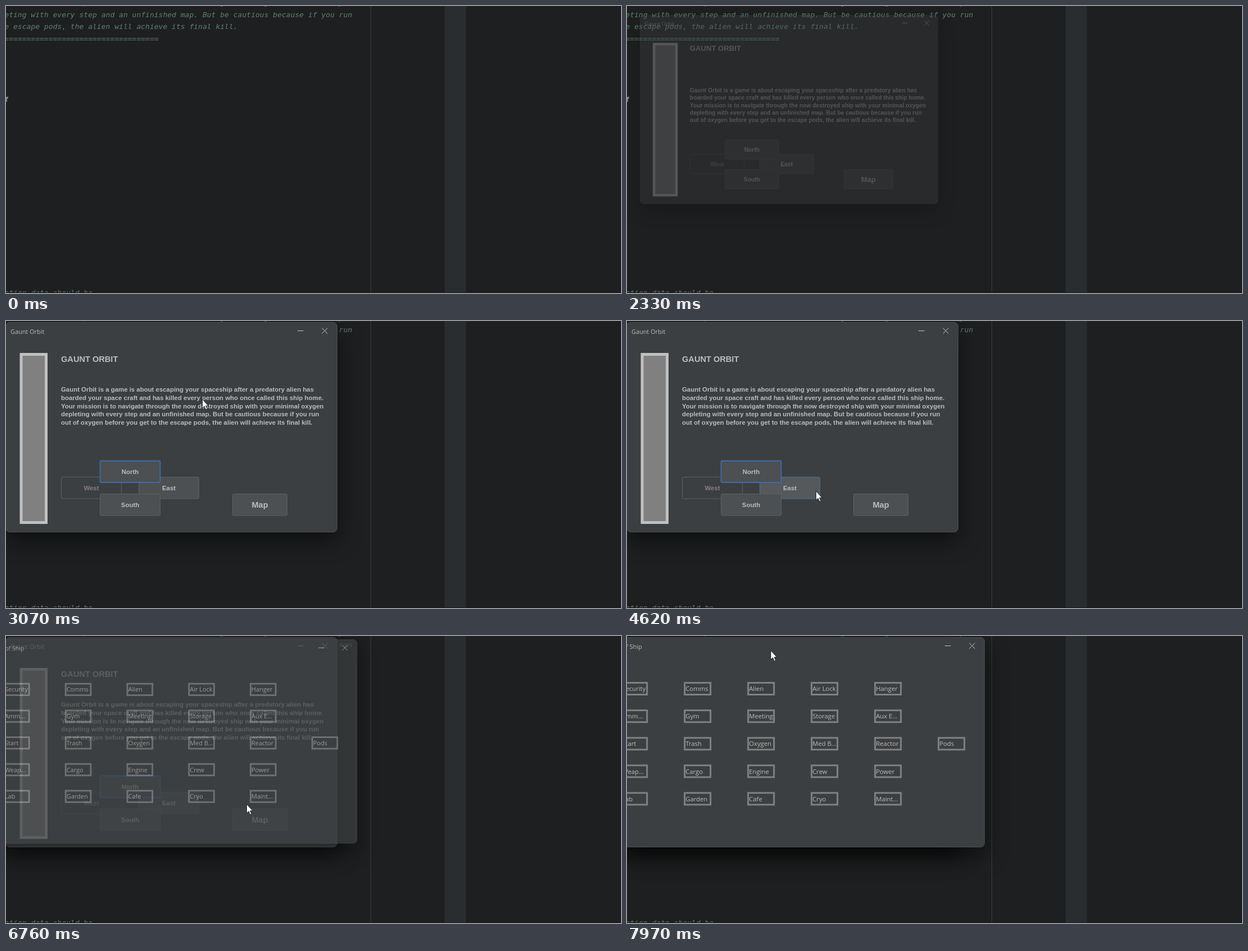
Animation, 1095 px wide and 512 px high, one loop 8000 ms. Source, as an HTML page:

```html
<!DOCTYPE html>
<html lang="en">
<head>
<meta charset="utf-8">
<title>Game window over an editor</title>
<style>
  html, body { margin: 0; width: 100%; height: 100%; overflow: hidden; background: #1e1f20; }
  svg { display: block; width: 100%; height: 100%; }
  text { fill: #bbb; white-space: pre; }
  .code text { font: italic 13.02px "DejaVu Sans Mono", monospace; fill: #5f826b; }
  .code .plain { font-style: normal; fill: #bcbec4; }
  .ui { font: 11.3px "Open Sans", sans-serif; }
  .title { font: 10.9px "Open Sans", sans-serif; }
  .bold { font: bold 11.42px "Liberation Sans", Arial, sans-serif; }
  .large { font: bold 14.6px "Liberation Sans", Arial, sans-serif; }
  .mid { text-anchor: middle; }
  .frame { fill: #3c3f41; stroke: #4b4e50; filter: drop-shadow(0 14px 19px rgba(0, 0, 0, .55)); }
  .controls { stroke: #c4c4c4; fill: none; }
  .button rect { fill: #4c5052; stroke: #5e6060; }
  .button.off rect { fill: none; }
  .button.off text { fill: #857f80; }
  .button.focus rect { stroke: #3f6cab; stroke-width: 1.8; }
  .button.hover rect { fill: #55595c; stroke: #46709f; }
  .room { fill: none; stroke: #808080; stroke-width: 3; }
</style>
</head>
<body>
<svg viewBox="0 0 1095 512" preserveAspectRatio="none">
  <rect width="1095" height="512" fill="#1e1f20"/>
  <rect x="649" width="1" height="512" fill="#3a3c3f"/>
  <rect x="781" width="38" height="512" fill="#2a2d30"/>
  <g class="code" id="code"></g>
  <path d="M0 511.5H1095M1094.5 0V512" stroke="#17181a"/>
  <g id="game"></g>
  <g id="map"></g>
  <path id="beam" d="M0 .5H2.5L3.5 1.5L4.5 .5H7M3.5 1.5V13.5M0 14.5H2.5L3.5 13.5L4.5 14.5H7" fill="none" stroke="#d0d0d0"/>
  <path id="arrow" d="M.5 .5V16.5L4.2 13.2L6.8 19.2L9.2 18.2L6.7 12.3H11.3Z" fill="#fff" stroke="#15181a" stroke-width=".9"/>
</svg>
<script>
const LOOP = 8000, TICK = 67;
const GAME_OPENS = 35, MAP_OPENS = 100;
const $ = id => document.getElementById(id);

function add(parent, tag, attrs, content) {
  const node = document.createElementNS('http://www.w3.org/2000/svg', tag);
  for (const name in attrs) node.setAttribute(name, attrs[name]);
  if (content) node.textContent = content;
  return parent.appendChild(node);
}
const label = (parent, x, y, content, cls) => add(parent, 'text', { x, y, class: cls }, content);

// Editor: row number and visible end of each line
[
  [0, 'ce called this ship home. Your mission is to navigate through the now destroyed'],
  [1, 'eting with every step and an unfinished map. But be cautious because if you run'],
  [2, 'e escape pods, the alien will achieve its final kill.'],
  [3, '='.repeat(35)],
  [8, 'f', 'plain'],
  [24, 'ation data should be']
].forEach(([row, content, cls = '']) => label($('code'), -2.7, -2.1 + row * 21.6, content, cls));

function drawWindow(parent, left, right) {
  add(parent, 'rect', { class: 'frame', x: left + .5, y: 2.5, width: right - left - 1, height: 374, rx: 7 });
  add(parent, 'path', {
    class: 'controls',
    d: `M${right - 71} 17.5h10.5M${right - 27.5} 12.5l10 10m0 -10l-10 10`
  });
}

function drawButton(x, y, width, content, cls = '', font = 'bold') {
  const button = add($('game'), 'g', { class: 'button ' + cls });
  add(button, 'rect', { x: x + .5, y: y + .5, width: width - 1, height: 38.5, rx: 2 });
  label(button, x + width / 2, y + (font === 'large' ? 25 : 24), content, font + ' mid');
  return { button, x, y, width };
}

drawWindow($('game'), -1, 590);
label($('game'), 8, 22.5, 'Gaunt Orbit', 'title');
add($('game'), 'rect', { x: 27, y: 59.5, width: 44.5, height: 300, fill: '#808080', stroke: '#bfc0c0', 'stroke-width': 5 });
label($('game'), 98, 72.7, 'GAUNT ORBIT', 'large');
const story = add($('game'), 'g');
[
  'Gaunt Orbit is a game is about escaping your spaceship after a predatory alien has',
  'boarded your space craft and has killed every person who once called this ship home.',
  'Your mission is to navigate through the now destroyed ship with your minimal oxygen',
  'depleting with every step and an unfinished map. But be cautious because if you run',
  'out of oxygen before you get to the escape pods, the alien will achieve its final kill.'
].forEach((line, i) => label(story, 98, 126 + i * 14.75, line, 'bold'));
drawButton(98, 278, 108, 'West', 'off');
const east = drawButton(236, 278, 108, 'East');
const north = drawButton(167, 249, 108, 'North');
drawButton(167, 308, 108, 'South');
const mapButton = drawButton(403, 308, 98, 'Map', '', 'large');

drawWindow($('map'), -46, 637);
add($('map'), 'text', { x: 26.7, y: 22.5, class: 'title', 'text-anchor': 'end' }, 'Map of Ship');
[
  ['Security', 'Amm...', 'Start', 'Weap...', 'Lab'],
  ['Comms', 'Gym', 'Trash', 'Cargo', 'Garden'],
  ['Alien', 'Meeting', 'Oxygen', 'Engine', 'Cafe'],
  ['Air Lock', 'Storage', 'Med B...', 'Crew', 'Cryo'],
  ['Hanger', 'Aux E...', 'Reactor', 'Power', 'Maint...'],
  ['', '', 'Pods']
].forEach((rooms, col) => rooms.forEach((room, row) => {
  if (!room) return;
  const x = -11.8 + col * 113, y = 82 + row * 49.1;
  add($('map'), 'rect', { class: 'room', x: x + 1.5, y: y + 1.5, width: 46, height: 21 });
  label($('map'), x + 3, y + 16.2, room, 'ui');
}));

// Pointer strokes: [tick, x, y]
const strokes = [
  [[42, 413, 22], [44, 386, 85], [46, 349, 139]],
  [[52, 349, 139], [56, 402, 240], [60, 470, 316], [63, 534, 318], [65, 520, 250], [67, 430, 222],
   [69, 336, 303], [72, 405, 404], [75, 534, 350], [77, 515, 277], [79, 455, 264], [82, 356, 312],
   [85, 430, 372], [88, 531, 330], [91, 474, 277], [93, 442.5, 297.5], [96, 446, 318],
   [99, 440, 321], [103, 408, 263], [108, 338, 145], [114, 259, 32]],
  [[117, 259, 32], [119, 255.5, 25.5]]
];

function catmullRom(a, b, c, d, u) {
  return b + u / 2 * (c - a + u * (2 * a - 5 * b + 4 * c - d + u * (3 * (b - c) + d - a)));
}

function pointerAt(tick) {
  const keys = strokes.filter(s => s[0][0] <= tick).pop();
  if (!keys) return null;
  const last = keys.length - 1;
  if (tick >= keys[last][0]) return keys[last].slice(1);
  const i = keys.findIndex(k => k[0] > tick) - 1;
  const around = [-1, 0, 1, 2].map(n => keys[Math.min(last, Math.max(0, i + n))]);
  const u = (tick - keys[i][0]) / (keys[i + 1][0] - keys[i][0]);
  return [1, 2].map(axis => catmullRom(...around.map(k => k[axis]), u));
}

function place(node, point) {
  node.style.display = point ? '' : 'none';
  if (point) node.setAttribute('transform', `translate(${point})`);
}

function openWindow(node, age, cx) {
  const scale = age > 3 ? 1 : 1 - .102 * .28 ** age;
  node.style.display = age < 0 ? 'none' : '';
  node.setAttribute('opacity', Math.min(1, .34 + .4 * age));
  node.setAttribute('transform', `translate(${cx} 143) scale(${scale}) translate(${-cx} -143)`);
}

function hover({ button, x, y, width }, point) {
  const inside = point && point[0] >= x && point[0] <= x + width && point[1] >= y && point[1] <= y + 39;
  button.classList.toggle('hover', !!inside);
}

function render(time) {
  const tick = Math.floor((time % LOOP + 15) / TICK);
  const point = pointerAt(tick);
  openWindow($('game'), tick - GAME_OPENS, 234);
  openWindow($('map'), tick - MAP_OPENS, 226);

  // The story jumps up two lines and North takes focus once the window is laid out
  const laidOut = tick > GAME_OPENS;
  place(story, [0, laidOut ? 0 : 29.5]);
  north.button.classList.toggle('focus', laidOut);

  hover(east, point);
  hover(mapButton, point);
  place($('arrow'), point);
  place($('beam'), tick === 3 ? [1080, 503] : tick === 9 ? [1085, 14] : null);
}

const start = performance.now();
function loop() {
  render(performance.now() - start);
  requestAnimationFrame(loop);
}
loop();
</script>
</body>
</html>
```
